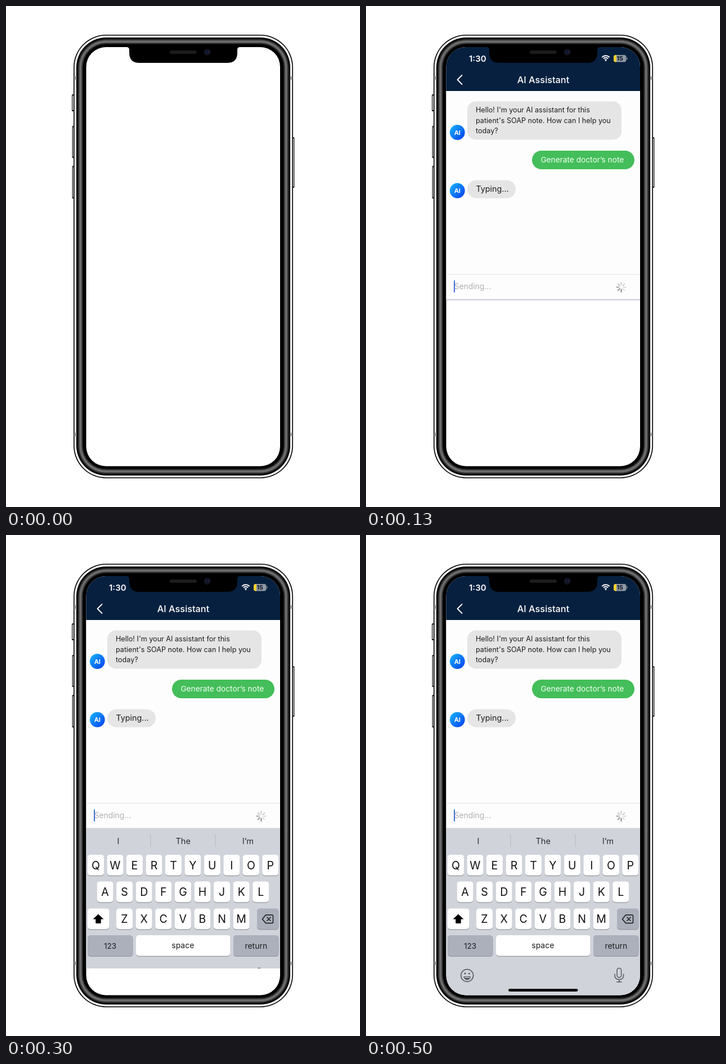
These frames come from a looping animation (629x890 px, 5.01 s). An HTML page with a canvas:

```html
<!DOCTYPE html>
<html lang="en">
<head>
<meta charset="utf-8">
<title>AI Assistant chat</title>
<style>
  html, body { margin: 0; width: 100%; height: 100%; overflow: hidden; background: #fff; }
  canvas { display: block; width: 629px; height: 890px; }
</style>
</head>
<body>
<canvas id="stage"></canvas>
<script>
const W = 629, H = 890, LOOP = 5010, STEPS = 15;
const FONT = 'Inter, "Liberation Sans", sans-serif';
const canvas = document.getElementById('stage');
const ctx = canvas.getContext('2d');
const dpr = window.devicePixelRatio || 1;
canvas.width = W * dpr;
canvas.height = H * dpr;

function box(x, y, w, h, r, fill) {
  ctx.beginPath();
  ctx.roundRect(x, y, w, h, r);
  ctx.fillStyle = fill;
  ctx.fill();
}

function disc(x, y, r, fill) {
  ctx.beginPath();
  ctx.arc(x, y, r, 0, Math.PI * 2);
  ctx.fillStyle = fill;
  ctx.fill();
}

function stroke(path, color, width) {
  ctx.strokeStyle = color;
  ctx.lineWidth = width;
  ctx.lineCap = ctx.lineJoin = 'round';
  ctx.stroke(new Path2D(path));
}

function text(str, x, y, size, color, weight = 400, align = 'left') {
  ctx.font = `${weight} ${size}px ${FONT}`;
  ctx.textAlign = align;
  ctx.textBaseline = 'alphabetic';
  ctx.fillStyle = color;
  ctx.fillText(str, x, y);
}

// Rounded body outline, shrunk evenly by d pixels
function shell(d, fill) {
  box(120 + d, 51 + d, 390 - 2 * d, 788 - 2 * d, 58 - d, fill);
}

function sideButton(x, y, h) {
  box(x, y, 6, h, 1.5, '#111');
  box(x + 1.2, y + 2, 3.6, h - 4, 1, '#e8e8e8');
}

function drawBody() {
  sideButton(117, 157, 30);
  sideButton(117.6, 213, 57);
  sideButton(117.6, 284, 58);
  sideButton(506.4, 233, 90);
  shell(0, '#000');
  shell(1.6, '#f6f6f6');
  shell(5, '#000');
  for (let d = 7; d < 17; d += 0.5) {
    const v = Math.round(22 + 92 * Math.sin(Math.PI * (d - 7) / 10) ** 2);
    shell(d, `rgb(${v},${v},${v})`);
  }
  shell(17, '#000');
  for (const y of [125, 758]) {
    box(121, y, 4.5, 6, 0, '#9a9a9a');
    box(504.5, y, 4.5, 6, 0, '#9a9a9a');
  }
  box(142.5, 73, 344.5, 744.5, 35, '#fff');
}

function drawNotch() {
  ctx.fillStyle = '#000';
  ctx.fill(new Path2D('M214 72H416V73Q411 73 411 78V83Q411 101 393 101H237Q219 101 219 83V78Q219 73 214 73Z'));
  box(291, 79, 48, 6, 3, '#1d1b1b');
  disc(357.5, 82, 6, '#14151b');
  disc(357.5, 82, 3.6, '#0b1024');
  disc(355.5, 81.5, 1.1, '#27366f');
  disc(359.7, 81.5, 1.1, '#27366f');
}

function drawHeader() {
  box(142, 70, 346, 81, 0, '#07203f');
  text('1:30', 183, 98.5, 15, '#fff', 600);
  text('AI Assistant', 315, 136.7, 16.3, '#fff', 500, 'center');
  stroke('M170.5 123L162.5 131L170.5 139', '#fff', 1.8);

  ctx.lineCap = 'butt';
  ctx.strokeStyle = '#fff';
  ctx.lineWidth = 2;
  for (const r of [5.6, 9.2]) {
    ctx.beginPath();
    ctx.arc(426, 97.4, r, -Math.PI * 0.76, -Math.PI * 0.24);
    ctx.stroke();
  }
  ctx.beginPath();
  ctx.moveTo(426, 98.4);
  ctx.arc(426, 97.4, 3, -Math.PI * 0.76, -Math.PI * 0.24);
  ctx.fillStyle = '#fff';
  ctx.fill();

  box(440, 87, 22.5, 12.5, 4, '#8f97a3');
  box(440, 87, 4.8, 12.5, [4, 0, 0, 4], '#fad02c');
  box(463.2, 91, 1.4, 4.5, [0, 1.4, 1.4, 0], '#7d8694');
  text('15', 451, 97.2, 11, '#0b1626', 700, 'center');
}

function avatar(y) {
  const g = ctx.createLinearGradient(153, y - 9, 172, y + 9);
  g.addColorStop(0, '#12a4fa');
  g.addColorStop(1, '#0a4df2');
  disc(162.3, y, 13.4, g);
  text('AI', 162.3, y + 4, 11, '#fff', 700, 'center');
}

function drawChat() {
  box(142, 151, 346, 370, 0, '#fdfdfd');
  box(180, 169.5, 274, 68, 15, '#e5e5e5');
  ['Hello! I\'m your AI assistant for this',
   'patient\'s SOAP note. How can I help you',
   'today?'].forEach((line, i) => text(line, 195, 189 + i * 18.7, 12.6, '#1c1c1c'));
  avatar(224.5);

  box(295, 257, 182, 33, 16.5, '#43be5a');
  text('Generate doctor’s note', 384.3, 277.6, 13.7, '#f4fff5', 400, 'center');

  box(180, 309.5, 86, 32, 16, '#e5e5e5');
  text('Typing...', 195.5, 330.3, 14.3, '#1c1c1c');
  avatar(328);

  box(142, 476, 346, 1, 0, '#e3e3e5');
  text('Sending...', 156.5, 503, 13.9, '#b1b1b3');
  box(156, 487.5, 2, 21.5, 1, '#426fdc');

  // Busy wheel: spokes darken around to the lower left
  for (let i = 0; i < 8; i++) {
    const a = Math.PI * (0.5 + i / 4), c = Math.cos(a), s = Math.sin(a);
    const v = i < 3 ? 130 + i * 16 : 180 + i * 6;
    stroke(`M${453.5 + 4 * c} ${499.5 + 4 * s}L${453.5 + 8.3 * c} ${499.5 + 8.3 * s}`,
      `rgb(${v},${v},${v})`, 2);
  }
}

function key(x, y, w, dark) {
  box(x, y + 1, w, 37, 5, '#94979e');
  box(x, y, w, 36.8, 5, dark ? '#abb0bb' : '#fff');
}

function letterRow(letters, x, y, pitch) {
  [...letters].forEach((ch, i) => {
    const cx = x + i * pitch;
    key(cx - 14.5, y, 29, false);
    text(ch, cx, y + 25.7, 19.5, '#111', 400, 'center');
  });
}

function drawKeyboard() {
  box(142, 520.5, 346, 300, 0, '#d0d3da');
  ['I', 'The', 'I’m'].forEach((w, i) => text(w, 199.5 + i * 115.2, 549, 14.5, '#2b2c2f', 400, 'center'));
  box(256.5, 532, 1, 22, 0, '#b7bac2');
  box(371.5, 532, 1, 22, 0, '#b7bac2');

  letterRow('QWERTYUIOP', 159.5, 568, 34.48);
  letterRow('ASDFGHJKL', 176, 615.5, 34.6);
  letterRow('ZXCVBNM', 210.5, 663.5, 34.6);

  key(145, 663.5, 38.5, false);
  ctx.fillStyle = '#000';
  ctx.fill(new Path2D('M164 673.5L173.5 682.5H168.7V689Q168.7 690 167.7 690H160.3Q159.3 690 159.3 689V682.5H154.5Z'));
  key(446, 663.5, 38.5, true);
  stroke('M461.5 675H472.5Q474.5 675 474.5 677V687.5Q474.5 689.5 472.5 689.5H461.5L455.5 682.3Z', '#111', 1.4);
  stroke('M463.8 679L470 685.3M470 679L463.8 685.3', '#111', 1.4);

  key(145, 711, 80.5, true);
  key(231, 711, 167.5, false);
  key(404, 711, 80.5, true);
  text('123', 185, 734.5, 13.6, '#1d1e20', 400, 'center');
  text('space', 314.3, 733.5, 14, '#1d1e20', 400, 'center');
  text('return', 444.3, 734.5, 14, '#1d1e20', 400, 'center');

  const ink = '#56595f';
  ctx.beginPath();
  ctx.arc(179.7, 782.5, 11, 0, Math.PI * 2);
  ctx.strokeStyle = ink;
  ctx.lineWidth = 1.6;
  ctx.stroke();
  disc(176, 779, 1.6, ink);
  disc(183.4, 779, 1.6, ink);
  ctx.beginPath();
  ctx.arc(179.7, 784, 6.4, 0, Math.PI);
  ctx.closePath();
  ctx.fillStyle = ink;
  ctx.fill();
  box(175, 785, 9.4, 1.5, 0.7, '#d0d3da');

  ctx.beginPath();
  ctx.roundRect(446, 769.5, 7.6, 16.5, 3.8);
  ctx.lineWidth = 1.5;
  ctx.strokeStyle = ink;
  ctx.stroke();
  stroke('M442 780V782Q442 789.8 449.8 789.8Q457.6 789.8 457.6 782V780M449.8 790V794M445.5 794H454', ink, 1.5);

  box(253, 806.3, 123.5, 4.6, 2.3, '#000');
}

// Thirtieth-of-a-second steps, each shown from its time rounded to 10 ms
function stepAt(t) {
  let k = 0;
  while (k < STEPS && Math.round((k + 1) * 10 / 3) * 10 <= t) k++;
  return k;
}

function drawScreen(t) {
  const k = stepAt(t);
  if (!k) return;
  const shown = 1 - (1 - k / STEPS) ** 3;
  ctx.save();
  ctx.beginPath();
  ctx.roundRect(142.5, 73, 344.5, 744.5, 35);
  ctx.clip();
  ctx.beginPath();
  ctx.rect(140, 70.4, 350, 747.5 * shown);
  ctx.clip();
  drawChat();
  drawHeader();
  drawKeyboard();
  ctx.restore();
}

function draw(t) {
  ctx.setTransform(dpr, 0, 0, dpr, 0, 0);
  ctx.fillStyle = '#fff';
  ctx.fillRect(0, 0, W, H);
  drawBody();
  drawScreen(t);
  drawNotch();
}

let start = null;
function tick(now) {
  if (start === null) start = now;
  draw((now - start) % LOOP);
  requestAnimationFrame(tick);
}
draw(0);
requestAnimationFrame(tick);
</script>
</body>
</html>
```
